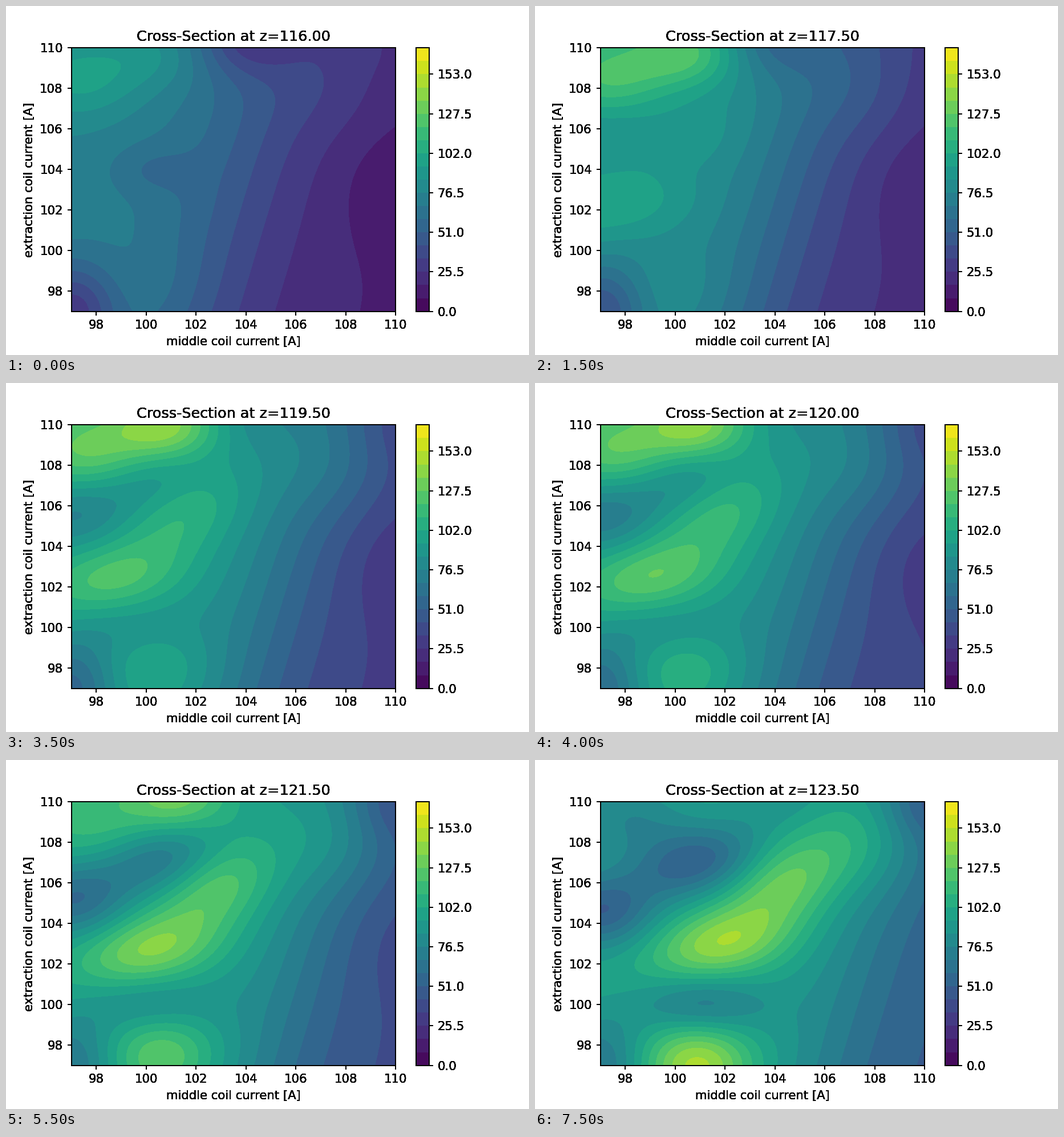
A matplotlib script that plays this animation: 917x611 px, repeating every 8 s.

```python
import numpy as np
import matplotlib.pyplot as plt
from matplotlib.animation import FuncAnimation

FRAMES, INTERVAL = 16, 500
Z0, DZ = 116.0, 0.5
SPAN = DZ * (FRAMES - 1)
LEVELS = np.linspace(0, 170, 21)
LOW, HIGH = 97, 110
PASSES = 6  # repeated ink gives the hard, heavy text and lines

plt.rcParams.update({"font.family": "DejaVu Sans", "font.size": 10})

axis = np.linspace(LOW, HIGH, 131)
x, y = np.meshgrid(axis, axis)


def bump(t, start, size, heights, end=None, tilt=0):
    """Gaussian hill drifting from start to end; heights are evenly timed."""
    (x0, y0), (x1, y1) = start, end or start
    ease = t ** 1.5
    dx = x - x0 - (x1 - x0) * ease
    dy = y - y0 - (y1 - y0) * ease
    c, s = np.cos(np.radians(tilt)), np.sin(np.radians(tilt))
    u = (c * dx + s * dy) / size[0]
    v = (c * dy - s * dx) / size[1]
    height = np.interp(t, np.linspace(0, 1, len(heights)), heights)
    return height * np.exp(-(u * u + v * v) / 2)


def slope(u):
    """Plateau on the left that falls along a slanted front moving right."""
    floor = 15 + 4.3 * u
    plateau = 100 - 25 * np.exp(-u / 1.5)
    front = 103.2 + 0.5 * u + 0.25 * (y - 101)
    return floor + (plateau - floor) / (1 + np.exp((x - front) / (1.9 - 0.06 * u)))


def surface(z):
    u = z - Z0
    t = u / SPAN
    total = slope(u)
    # rising central ridge
    total += bump(t, (97.2, 102.2), (2, 1.2), (0, 20, 38, 43), (101.8, 103), 18)
    total += bump(t, (100.3, 105.7), (1.9, 1.3), (0, 12, 30, 34), (104.4, 106), 45)
    total += bump(t, (107.5, 108), (1.6, 1.8), (5, 9, 12, 17))
    # peaks along the upper and lower edge
    total += bump(t, (97.3, 108.5), (1.7, 1.4), (22, 36, 26, -22), (98.2, 109.2))
    total += bump(t, (100.3, 109.7), (1.5, 1.2), (14, 48, 42, 4), (101.8, 110.5))
    total += bump(t, (100.2, 98.5), (1.5, 1.5), (4, 3, 27, 50), (100.9, 97))
    # hollows
    total += bump(t, (97, 97), (1.25, 1.7), (-43, -47, -31, -32))
    total += bump(t, (98.5, 100), (1.8, 1.1), (0, -8, -18, -32), (101, 100))
    total += bump(t, (97, 106), (1.5, 1.3), (0, -12, -36, -47), (97, 104.6))
    total += bump(t, (100, 107.3), (1.9, 1.2), (0, -8, -30, -46), (100.8, 107), 20)
    total += bump(t, (100.2, 104), (1.2, 0.9), (-10, 0, 0, 0))
    total += bump(t, (104, 110.5), (1.5, 1.3), (-30, -18, 0, -14))
    total += bump(t, (110, 103), (1.5, 2), (-7, -7, -6, 0))
    total += bump(t, (110, 110), (1.2, 1.2), (3, 0, -12, -20))
    return np.clip(total, 0.1, 169.9)


def add_plot():
    ax = fig.add_axes([0.125, 0.125, 0.62, 0.755], facecolor="none")
    ax.set(xlim=(LOW, HIGH), ylim=(LOW, HIGH),
           xlabel="middle coil current [A]",
           ylabel="extraction coil current [A]")
    return ax


def add_bar():
    bar = fig.add_axes([0.78375, 0.125, 0.02515, 0.755], facecolor="none")
    bar.set(xticks=[], xlim=(0, 1), ylim=(0, 170))
    bar.yaxis.tick_right()
    ticks = LEVELS[::3]
    bar.set_yticks(ticks, [f"{v:.1f}" for v in ticks])
    return bar


fig = plt.figure(figsize=(6.0033, 4), dpi=152.75)
plots = [add_plot() for _ in range(PASSES)]
bars = [add_bar() for _ in range(PASSES)]
colours = dict(cmap="viridis", vmin=0, vmax=170)
middles = (LEVELS[:-1] + LEVELS[1:]) / 2
bars[0].pcolormesh([0, 1], LEVELS, middles[:, None], **colours)
layers = []


def update(i):
    z = Z0 + DZ * i
    while layers:
        layers.pop().remove()
    layers.append(plots[0].contourf(axis, axis, surface(z), LEVELS, **colours))
    for ax in plots:
        ax.set_title(f"Cross-Section at z={z:.2f}")
    return layers


update(0)
anim = FuncAnimation(fig, update, frames=FRAMES, interval=INTERVAL,
                     init_func=lambda: [], repeat=True, repeat_delay=0)
plt.show()
```
